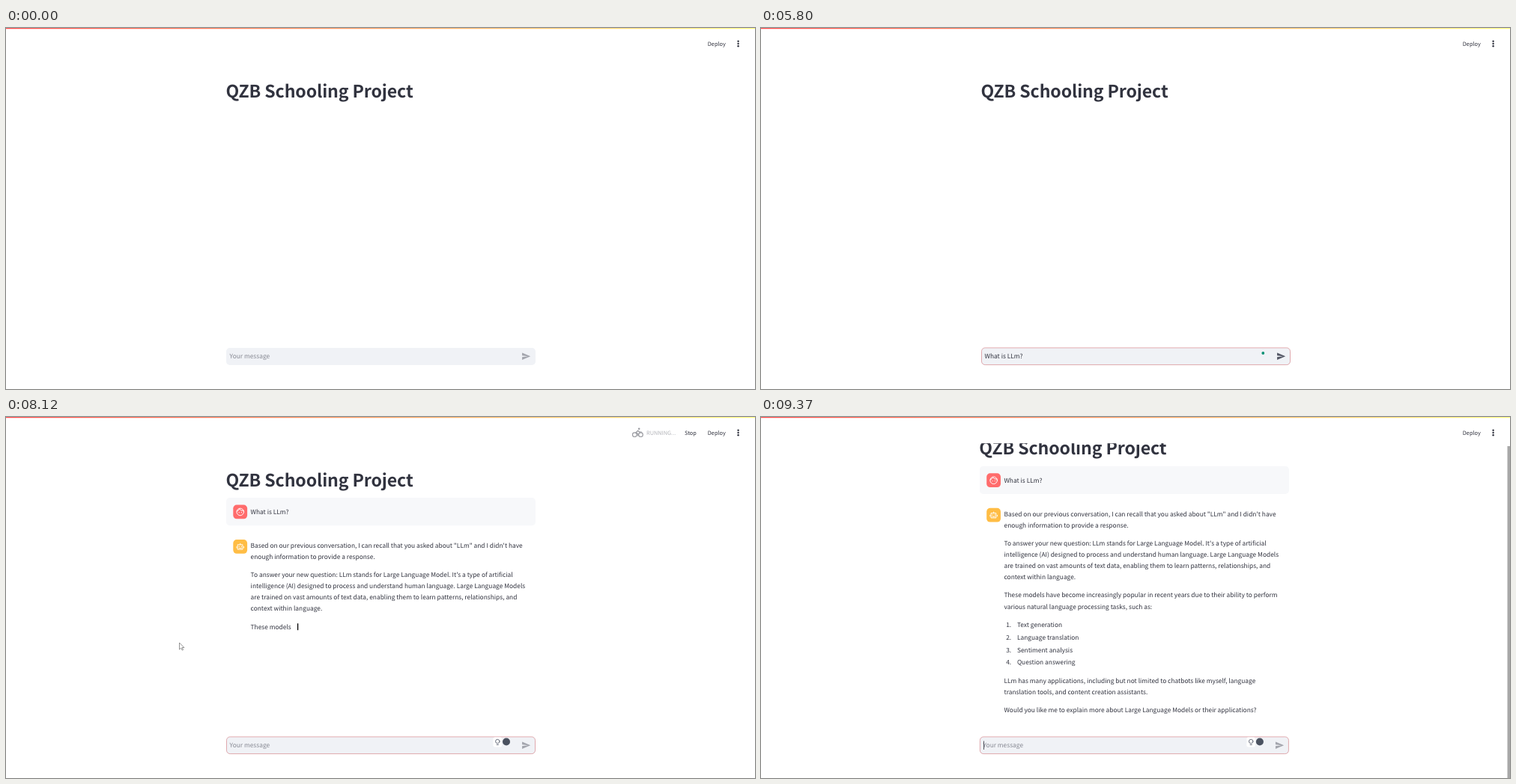
Recreate the animation shown at these times as an HTML page. Size 1000 by 483 pixels, loop 9.67 s.

```html
<!DOCTYPE html>
<html lang="en">
<head>
<meta charset="utf-8">
<title>Chat demo</title>
<style>
  html, body { margin: 0; width: 100%; height: 100%; overflow: hidden; background: #fff; }
  svg { display: block; width: 100vw; height: 100vh; }
  text {
    font: 400 8.4px "Noto Sans CJK SC", "Noto Sans CJK JP", "Noto Sans CJK", "Noto Sans", sans-serif;
    fill: #31333f; white-space: pre; text-rendering: geometricPrecision;
  }
  .title { font-size: 23.1px; font-weight: 700; letter-spacing: -.005em; }
  .small { font-size: 7.35px; }
  .line { fill: none; stroke-linecap: round; stroke-linejoin: round; }
  .sport { stroke: #9a9ba1; stroke-width: 1.2; }
  .white { stroke: #fff; stroke-width: 1.8; }
</style>
</head>
<body>
<svg viewBox="0 0 1000 483">
  <defs>
    <linearGradient id="rainbow"><stop stop-color="#ff4b4b"/><stop offset="1" stop-color="#fffd80"/></linearGradient>
  </defs>

  <g id="page">
    <text class="title" x="293.4" y="92.5">QZB Schooling Project</text>
    <g id="question">
      <rect x="294" y="108" width="413" height="37.2" rx="4.7" fill="#f7f8fa"/>
      <rect x="303.3" y="117.5" width="18.8" height="18.8" rx="4.7" fill="#ff6c6c"/>
      <g class="line white" transform="translate(306.400 120.600) scale(.53)">
        <circle cx="12" cy="12" r="9"/>
        <path d="M3.5 10.5Q8 9 10 4.500Q13 10 20.500 9"/>
        <path d="M9 13.500v.1M15 13.500v.1" stroke-width="2.4"/>
      </g>
      <text x="326.6" y="129.900">What is LLm?</text>
    </g>
    <g id="answer">
      <rect x="303.3" y="164" width="18.8" height="18.8" rx="4.7" fill="#ffbd45"/>
      <g class="line white" transform="translate(306.400 167.100) scale(.53)">
        <path d="M6 7h12v12h-12zM12 7v-3M3 12v3M21 12v3M9 16h6"/>
        <path d="M9.300 11.500v.1M14.700 11.500v.1" stroke-width="2.4"/>
      </g>
      <rect id="streamCaret" width="1.3" height="9"/>
    </g>
  </g>

  <rect width="1000" height="35.2" fill="#fff"/>
  <rect width="1000" height="1.2" fill="url(#rainbow)"/>
  <g id="running">
    <g class="line sport">
      <circle cx="844.6" cy="16.1" r=".8"/>
      <path d="M838.5 20.600l2-2.300 3 .3 1.700 2.200 2.600.2M843.300 18.800l-2 3.300 2.700 2-1 2.700M841.300 22.100l-1.300 2.500h-2.500"/>
    </g>
    <g class="line sport">
      <path d="M837.300 16.200h3.700l3 3.300M838.500 19.800l3.500-2"/>
      <circle cx="846.500" cy="17.700" r=".9"/>
      <path d="M837.500 22.300q2-1.500 4 0t4 0 3.500 0M837.500 25.300q2-1.500 4 0t4 0 3.500 0"/>
    </g>
    <g class="line sport">
      <circle cx="839.300" cy="23.700" r="2.8"/><circle cx="847.500" cy="23.700" r="2.8"/>
      <circle cx="845.200" cy="15.700" r=".7"/>
      <path d="M843.500 25v-2.700l-2.500-1.500 2.700-2.600 2.300 2h2.300"/>
    </g>
    <text class="small" x="855" y="24" style="fill:#b3b4b9">RUNNING...</text>
    <text class="small" x="906" y="24">Stop</text>
  </g>
  <text class="small" x="936.8" y="24">Deploy</text>
  <g fill="#31333f">
    <circle cx="977.600" cy="17.700" r="1.2"/><circle cx="977.600" cy="21" r="1.2"/><circle cx="977.600" cy="24.300" r="1.2"/>
  </g>
  <rect id="thumb" x="996.5" y="35.2" width="3.5" height="444.500" fill="#a8a8a8"/>

  <g id="composer">
    <rect x="294" y="428" width="413" height="23" rx="4.7" fill="#f0f2f6"/>
    <rect id="focusRing" x="294.500" y="427.900" width="412" height="22.700" rx="4.7" fill="none" stroke="#d98a90" stroke-width=".7"/>
    <text id="entry" x="298.6" y="442.400"></text>
    <rect id="caret" y="433.500" width=".8" height="11.500" fill="#31333f"/>
    <circle id="badge" cx="668" cy="434.500" r="5.3" fill="#0b806a"/>
    <circle id="dot" cx="670.300" cy="435" r="1.9" fill="#0b9275"/>
    <g id="tools">
      <rect x="650.500" y="428.600" width="11.500" height="12.800" rx="2" fill="#fff"/>
      <g class="line" stroke="#6d7280"><circle cx="656.300" cy="434" r="2.7"/><path d="M655.200 438.500h2.200"/></g>
      <circle cx="668" cy="434.500" r="5" fill="#4b5260"/>
    </g>
    <path id="send" d="M2 21L23 12 2 3v7l15 2-15 2z" transform="translate(688 432.900) scale(.53)"/>
  </g>

  <path id="arrow" d="M0 0v9l2.200-1.900 1.600 3 1.300-.7-1.500-2.900h2.800z" fill="#fff" stroke="#666" stroke-width=".7"/>
  <path id="beam" class="line" d="M-1.500-5.500h3M0-5.500v11M-1.500 5.500h3" stroke="#555" stroke-width=".8"/>
</svg>

<script>
const LOOP = 9670;
const QUESTION = 'What is LLm?';
const KEY_TIMES = [1950, 2190, 2650, 2860, 3360, 3450, 3530, 3610, 4210, 4310, 4620, 5170];
const SENT = 5990, STREAM = 7150, TICK = 96;

// Each paragraph or list item: baseline of its first line, then its lines.
const BLOCKS = [
  [174.9, 'Based on our previous conversation, I can recall that you asked about "LLm" and I didn\'t have',
    'enough information to provide a response.'],
  [214.3, "To answer your new question: LLm stands for Large Language Model. It's a type of artificial",
    'intelligence (AI) designed to process and understand human language. Large Language Models',
    'are trained on vast amounts of text data, enabling them to learn patterns, relationships, and',
    'context within language.'],
  [283.7, 'These models have become increasingly popular in recent years due to their ability to perform',
    'various natural language processing tasks, such as:'],
  [323.1, '1.Text generation'], [340, '2.Language translation'],
  [356.8, '3.Sentiment analysis'], [373.7, '4.Question answering'],
  [397.8, 'LLm has many applications, including but not limited to chatbots like myself, language',
    'translation tools, and content creation assistants.'],
  [437.2, 'Would you like me to explain more about Large Language Models or their applications?'],
];
// Words shown over time
const WORDS = [[STREAM, 1], [8110, 71], [8590, 99.7], [9070, 132]];
const ARROW_PATH = [[7050, 291, 430], [7150, 293.5, 345], [7250, 265, 318], [7350, 240, 305], [7450, 231.5, 302]];
const BEAM_PATH = [[290, 388, 444], [390, 379, 440]];

const $ = id => document.getElementById(id);
const show = (el, on) => { el.style.display = on ? '' : 'none'; };
const move = (el, x, y) => el.setAttribute('transform', `translate(${x} ${y})`);
const latest = (steps, t) => steps.filter(s => s[0] <= t).pop();

function addText(x, y) {
  const el = document.createElementNS('http://www.w3.org/2000/svg', 'text');
  el.setAttribute('x', x);
  el.setAttribute('y', y);
  return $('answer').appendChild(el);
}

const lines = [];
let wordTotal = 0;
for (const [top, ...rows] of BLOCKS) {
  rows.forEach((row, i) => {
    const [, mark, body] = row.match(/^(\d\.)?(.*)$/);
    const y = top + i * 15.02, x = mark ? 344 : 326.6;
    const words = body.split(' ');
    lines.push({ x, y, words, mark, start: wordTotal, el: addText(x, y), markEl: mark && addText(329.3, y) });
    wordTotal += words.length;
  });
}

function wordsAt(t) {
  if (t < STREAM) return 0;
  const tick = STREAM + Math.floor((t - STREAM) / TICK) * TICK;
  for (let i = 1; i < WORDS.length; i++) {
    const [t0, n0] = WORDS[i - 1], [t1, n1] = WORDS[i];
    if (tick <= t1) return n0 + (n1 - n0) * (tick - t0) / (t1 - t0);
  }
  return wordTotal;
}

function partial(words, n) {
  const whole = Math.floor(n + 1e-6);
  const next = words[whole] || '';
  const piece = next.slice(0, Math.round((n - whole) * next.length));
  return words.slice(0, whole).concat(piece || []).join(' ');
}

function drawAnswer(count) {
  let last;
  for (const line of lines) {
    const n = Math.max(0, Math.min(line.words.length, count - line.start));
    line.el.textContent = partial(line.words, n);
    line.el.style.opacity = n <= 1 ? .65 : 1;
    if (line.mark) line.markEl.textContent = n > 0 ? line.mark : '';
    if (n > 0) last = line;
  }
  lines[0].el.setAttribute('y', lines[0].y + (count <= 17 ? 1.8 : 0));
  const streaming = count > 1 && count < wordTotal;
  show($('streamCaret'), streaming);
  if (streaming) {
    $('streamCaret').setAttribute('x', last.x + last.el.getComputedTextLength() + 8.2);
    $('streamCaret').setAttribute('y', last.y - 7.5);
  }
}

function typedAt(t) {
  if (t >= SENT) return '';
  if (t >= 970 && t < 1680) return 'T';
  return QUESTION.slice(0, KEY_TIMES.filter(k => k <= t).length);
}

function drawComposer(t) {
  const typed = typedAt(t);
  const entry = $('entry');
  entry.textContent = typed || 'Your message';
  entry.style.fill = typed ? '#31333f' : '#878993';
  $('send').setAttribute('fill', typed ? '#555866' : '#a3a5ad');
  $('focusRing').style.opacity = t < 590 ? 0 : t < 690 ? .4 : t < 770 ? .75 : 1;

  const blinkOn = t < 6290 ? !(t >= 5800 && t < SENT) : Math.floor((t - 6290) / 400) % 2 === 1;
  show($('caret'), t >= 590 && blinkOn);
  $('caret').setAttribute('x', 299.1 + (typed ? entry.getComputedTextLength() : 0));

  show($('badge'), t >= 1120 && t < 1680);
  show($('dot'), t >= 1680 && t < SENT);
  show($('tools'), t >= 7050);
}

function drawPointer(t) {
  const entering = t >= 190 && t < 290;
  const leaving = t >= 7050 && t < 9280;
  show($('arrow'), entering || leaving);
  if (entering) move($('arrow'), 401, 458);
  if (leaving) move($('arrow'), ...latest(ARROW_PATH, t).slice(1));

  const beam = t < 970 && latest(BEAM_PATH, t);
  show($('beam'), beam);
  if (beam) move($('beam'), beam[1], beam[2]);
}

function draw(t) {
  const count = wordsAt(t);
  const overflow = count > 99;
  const scroll = count > 118 ? 42.2 : count > 112 ? 17.8 : 0;
  const shift = overflow ? -2.1 : 0;

  show($('question'), t >= SENT);
  show($('answer'), t >= 7050);
  drawAnswer(count);
  drawComposer(t);
  drawPointer(t);

  move($('page'), shift, -scroll);
  move($('composer'), shift, 0);
  show($('thumb'), overflow);
  move($('thumb'), 0, scroll * .09);

  show($('running'), t >= 6500 && t < 9190);
  const sport = Math.floor((t - 6500) / 200) % 3;
  document.querySelectorAll('.sport').forEach((el, i) => show(el, i === sport));
}

function frame() {
  draw(performance.now() % LOOP);
  requestAnimationFrame(frame);
}
frame();
</script>
</body>
</html>
```
